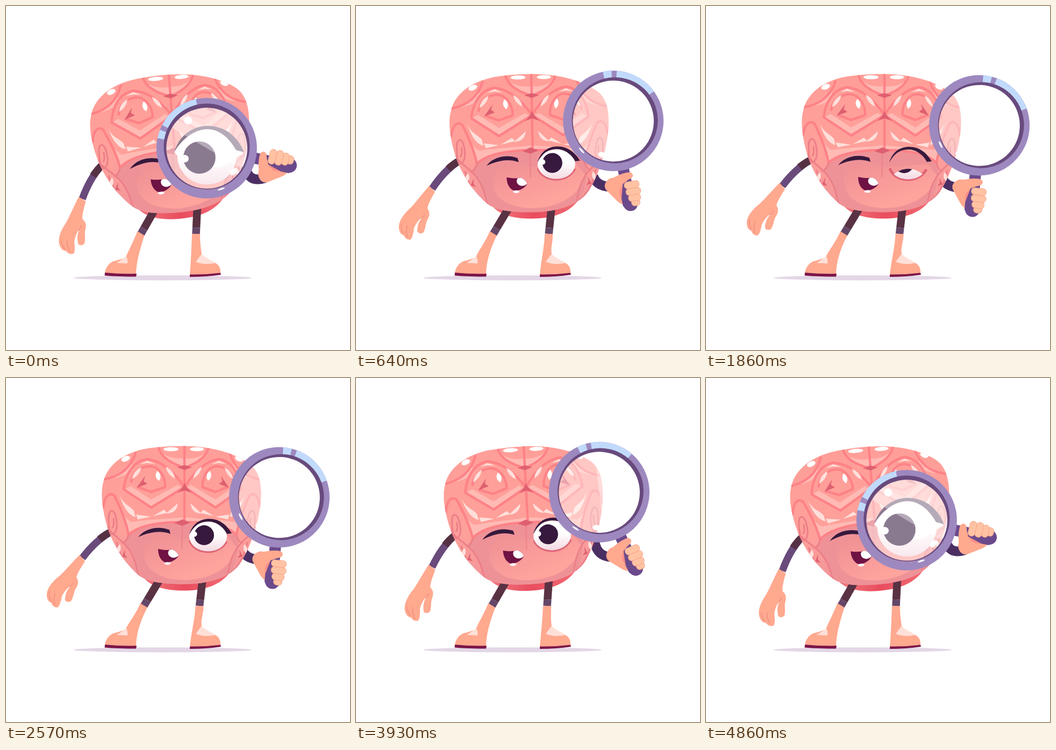
These frames come from a looping animation (640 px wide and 640 px high, 6.78 s). An HTML page:

```html
<!DOCTYPE html>
<html lang="en">
<head>
<meta charset="utf-8">
<title>Brain with magnifying glass</title>
<style>
html, body { margin: 0; width: 100%; height: 100%; overflow: hidden; background: #fff; }
svg { display: block; width: 100vw; height: 100vh; }
.groove { fill: none; stroke: #fd8287; stroke-width: 4.5; stroke-linejoin: round; stroke-linecap: round; }
.soft { stroke: #ec7f88; stroke-width: 3; }
.facet { fill: #ffbab4; }
.pit { fill: #de6070; }
.pale { fill: #ffdfda; }
.white { fill: #fff; }
.ink { fill: #36193d; }
.skin { fill: #ffa98f; }
.sole { fill: #7c1549; }
.tip { fill: #ffc3a3; stroke: #f59a84; stroke-width: .8; }
</style>
</head>
<body>
<svg viewBox="0 0 640 640">
<defs>
  <path id="outline" d="M330 126.500C385 126.500 432 142 456 162C473 177 476 200 474 230C470 270 456 312 437 343C425 362 395 383.500 330 383.500C290 383.500 262 379 247 367C220 344 198 310 187 272C178 240 176 212 181 194C188 161 222 136 270 130C290 127.500 310 126.500 330 126.500Z"/>
  <clipPath id="inBody"><use href="#outline"/></clipPath>
  <clipPath id="inEye"><path id="lid" d="M335 332V290Q376 242 418 290V332Z"/></clipPath>
  <clipPath id="inBigEye"><path id="bigLid"/></clipPath>
  <clipPath id="inGlass"><circle r="77"/></clipPath>
  <clipPath id="inMouth"><path id="mouth" d="M283 318C292 320 302 321 309 319C315 321 320 326 321 331C316 339 306 344 296 343C287 339 283 329 283 318Z"/></clipPath>
  <linearGradient id="bodyFill" x2="0" y2="1"><stop stop-color="#ff9e98"/><stop offset=".6" stop-color="#ffa09a"/><stop offset="1" stop-color="#f0939a"/></linearGradient>
  <linearGradient id="cheekFill" x2=".6" y2=".8"><stop stop-color="#ee8f94"/><stop offset="1" stop-color="#ffa39d"/></linearGradient>
  <linearGradient id="eyeFill" x2="0" y2="1"><stop offset=".45" stop-color="#fff"/><stop offset="1" stop-color="#f3d9e2"/></linearGradient>
  <linearGradient id="underFill"><stop stop-color="#f27a80"/><stop offset=".5" stop-color="#e94d5e"/><stop offset="1" stop-color="#f06a72"/></linearGradient>
  <path id="leaf" d="M0-10Q8 0 0 10Q-8 0 0-10Z"/>

  <g id="half">
    <path class="facet" d="M292 141C305 149 320 151 332 149V166C318 162 303 155 292 141ZM221 207L232 201L270 226L319 199L328 205L270 238ZM187 187C206 181 223 174 233 157L237 168C227 181 208 187 187 187ZM207 226C217 254 224 264 234 268C262 263 295 263 332 259V269C280 269 248 275 228 291Z"/>
    <path class="groove" d="M284 130C288 146 305 158 332 167M184 188C205 184 230 174 241 140M332 203L270 241L219 207C222 178 238 154 263 151C288 154 312 174 332 203M246 203L270 212L296 203C297 184 285 165 268 164C248 165 237 174 233 193M181 240C184 218 193 212 202 219C215 246 224 268 228 292C246 274 285 268 332 268"/>
    <path class="groove soft" d="M191 263C190 244 201 240 205 261C209 282 202 294 195 290C191 285 191 274 191 263M200 262C201 270 200 276 198 278M187 276C198 292 219 304 228 318C242 338 242 354 247 369M206 306C211 330 226 355 240 362M228 292C226 300 222 305 217 307"/>
    <path class="pit" d="M259 182L243 204L263 197L256 192ZM222 319L216 332L226 335L221 329Z"/>
    <path class="pale" d="M211 216C218 236 230 237 238 247L241 259C225 254 217 236 211 216ZM242 254L270 258L245 263ZM273 257L294 245L300 251ZM298 252L320 233C318 247 310 252 298 252ZM249 160L263 154L278 160L263 158Z"/>
    <use class="pale" href="#leaf" transform="translate(243 177) rotate(38) scale(.9 1.4)"/>
    <use class="pale" href="#leaf" transform="translate(306 176) rotate(-38) scale(.9 1.4)"/>
    <use class="pale" href="#leaf" transform="translate(210 318) rotate(12) scale(.9)"/>
    <use class="white" href="#leaf" transform="translate(283 182) rotate(-10) scale(1.1 .95)"/>
    <ellipse class="white" cx="222.500" cy="150.500" rx="8.500" ry="4.800" transform="rotate(-22 222 150)"/>
    <ellipse class="white" cx="307" cy="132.500" rx="14" ry="3.800"/>
  </g>
</defs>

<ellipse cx="291" cy="505.800" rx="166" ry="4.600" fill="#e3d6e6"/>

<g class="tilt"><path d="M252 366C266 389 298 395.500 330 395.500C364 395.500 394 388 413 366Z" fill="url(#underFill)"/></g>

<path id="sleeve" fill="none" stroke="#4b2f63" stroke-width="18"/>

<g class="tilt"><g id="arm">
  <path d="M194 287Q166 303 142 335" fill="none" stroke="#694a7b" stroke-width="13.500"/>
  <path d="M200 284Q186 290 174 300" fill="none" stroke="#563144" stroke-width="13.500"/>
  <path class="skin" d="M137 329L147 341C140 352 133 362 131 371C136 378 134 385 131 390C126 396 126 408 121 415C115 419 108 415 110 409C111 401 114 393 120 388C114 390 108 398 104 406C102 416 100 424 96 427C89 427 86 423 84 418C77 416 74 406 77 396C81 384 92 374 101 367C113 355 125 341 137 329Z"/>
  <path d="M81 397Q79 406 84 415M92 400Q87 411 91 422M118 388Q124 386 125 381" fill="none" stroke="#ef8880" stroke-width="1.200"/>
</g></g>

<g fill="none" stroke-width="14.500">
  <path id="thighL" stroke="#593243"/><path id="cuffL" stroke="#644768"/>
  <path id="thighR" stroke="#593243"/><path id="cuffR" stroke="#644768"/>
</g>
<path id="shinL" class="skin"/>
<path id="shinR" class="skin"/>
<path d="M206 478L224 466Q227 472 226 479ZM353 476L364 461C370 469 383 473 390 478Q370 483 353 476Z" fill="#ffe0d8"/>
<path class="sole" d="M184 496Q213 499 243 498L242 503.500Q210 503.500 183.500 501.500ZM342 499.500Q371 500 399 496.500L400 500Q372 504 342 504Z"/>

<g class="tilt">
  <use href="#outline" fill="url(#bodyFill)"/>
  <g clip-path="url(#inBody)">
    <path d="M228 292C246 274 285 268 328 270C380 266 415 272 428 292C440 310 424 345 412 390H247C244 345 240 325 217 307Z" fill="#ee9297"/>
    <path d="M308 291C275 288 257 300 257 326C257 356 285 376 335 376C385 375 420 350 430 316L412 294L327 300Z" fill="url(#cheekFill)"/>
    <use href="#half"/>
    <use href="#half" transform="translate(640.760) scale(-.93 1)"/>
    <path class="groove" d="M332 125V268"/>
    <path class="groove soft" d="M328 272L327 318" opacity=".6"/>
    <path class="pit" d="M318 214Q329 206 332 195Q336 206 347 214L332 209ZM318 166L332 162L346 166L332 171ZM313 270L328 263L343 269L328 275Z"/>
  </g>
  <path class="ink" d="M246 296C258 280 283 274 304 282.500L306 290C288 283 267 286 246 296Z"/>
  <use href="#mouth" fill="#6f1244"/>
  <g clip-path="url(#inMouth)"><ellipse class="white" cx="312" cy="325.500" rx="10.500" ry="9"/></g>
  <ellipse class="white" cx="300.500" cy="345" rx="6" ry="2.500"/>
  <path d="M342 302C350 327 394 332 410 304" fill="none" stroke="#de6474" stroke-width="5"/>
  <g clip-path="url(#inEye)">
    <ellipse cx="376" cy="295" rx="35" ry="27.500" fill="url(#eyeFill)"/>
    <circle class="ink" cx="368.500" cy="292.500" r="18.500"/>
    <circle class="white" cx="350.500" cy="290.500" r="5"/>
  </g>
  <path class="ink" d="M341 291C347 271 361 262 378 262C398 262 411 274 420 289L411 290C403 275 390 267 376 267C360 267 350 275 341 291Z"/>
</g>

<g id="lens">
  <g clip-path="url(#inGlass)">
    <g id="bigEye" transform="rotate(-10.500) translate(-373.500 -264.500)">
      <g clip-path="url(#inBigEye)">
        <ellipse cx="374" cy="279" rx="55" ry="53" fill="url(#eyeFill)"/>
        <path d="M313 272Q340 230 375 228Q420 235 442 274L400 300H340Z" fill="#fff"/>
        <circle class="ink" cx="360" cy="282" r="30"/>
      </g>
      <path id="bigLash" class="ink" d="M313 271C324 238 350 223 376 223C405 223 431 241 443 272L428 268C416 246 398 230 376 229C352 229 331 244 313 271Z"/>
    </g>
    <circle r="77" fill="#fff" opacity=".42"/>
    <path d="M-80 -29L80 29V-80H-80Z" fill="#fff" opacity=".36"/>
  </g>
  <path d="M89 -10.500H118L157 -13.500A13.500 13.500 0 0 1 158 13.500L118 13L110 10.500H89Z" fill="#6b4a8c" transform="rotate(1.200)"/>
  <circle r="85.300" fill="none" stroke="#9d89bf" stroke-width="16.400"/>
  <path id="shine" fill="none" stroke="#c1dafc" stroke-width="16.400"/>
  <path d="M-80.500 -3a80 80 0 1 1 160 0a80 80 0 1 1 -160 0ZM-75 0a75.300 75.300 0 1 0 150.600 0a75.300 75.300 0 1 0 -150.600 0Z" fill="#684a7d" fill-rule="evenodd"/>
  <circle class="white" cx="-43.300" cy="-44.300" r="7.500"/>
  <ellipse class="white" cx="57" cy="34" rx="8" ry="5" transform="rotate(-58 57 34)"/>
  <ellipse class="white" cx="40.400" cy="69.800" rx="7" ry="1.600" transform="rotate(-30 40.400 69.800)"/>
  <circle id="spark" class="white" cx="-36.200" cy="26.600" r="7"/>
  <g transform="rotate(-10.500) translate(-373.500 -264.500)">
    <path class="skin" d="M473 276C469 290 473 300 469 312C470 322 476 330 486 328L514 317C525 311 529 304 527 300L488 288Z"/>
    <path d="M488 295L518 308Q505 309 496 305Z" fill="#ff8f88"/>
    <path d="M486 284L528 291A11 11 0 0 1 526 311L512 308L488 295Z" fill="#6b4a8c"/>
    <path class="skin" d="M473 275C477 268 485 271 485 279C485 288 490 295 484 303L471 308C469 296 470 284 473 275Z"/>
    <g id="fingers"></g>
  </g>
</g>
</svg>
<script>
const $ = id => document.getElementById(id);
const set = (id, name, value) => $(id).setAttribute(name, value);
const LOOP = 6780, FRAME = 1000 / 14, RAD = Math.PI / 180;
const TILT = -4.5, PIVOT = [332, 497];

// cubic-bezier(.42, 0, .58, 1)
function ease(x) {
  if (x <= 0) return 0;
  if (x >= 1) return 1;
  let s = x;
  for (let i = 0; i < 5; i++)
    s -= (1.26 * s - .78 * s * s + .52 * s ** 3 - x) / (1.26 - 1.56 * s + 1.56 * s * s);
  return s * s * (3 - 2 * s);
}

function turn([x, y], deg, [cx, cy] = [0, 0]) {
  const c = Math.cos(deg * RAD), s = Math.sin(deg * RAD);
  return [cx + (x - cx) * c - (y - cy) * s, cy + (x - cx) * s + (y - cy) * c];
}

function arc(from, to, r) {
  return `M${turn([r, 0], from)}A${r} ${r} 0 0 1 ${turn([r, 0], to)}`;
}
set('shine', 'd', arc(-163, -113, 85.3) + arc(-179, -169, 85.3));

// x, y, half length of each finger
$('fingers').innerHTML = [[529, 286.5, 8], [520, 285, 11.5], [508.5, 282.5, 14], [496, 280.5, 14]]
  .map(([x, y, h]) => `<rect class="tip" x="${x - 6.5}" y="${y - h}" width="13" height="${2 * h}" rx="6" transform="rotate(14 ${x} ${y})"/>`)
  .join('');

function thigh(side, hip, knee) {
  const cuff = hip.map((v, i) => v + (knee[i] - v) * .78);
  set('thigh' + side, 'd', `M${hip}L${cuff}`);
  set('cuff' + side, 'd', `M${cuff}L${knee}`);
}

function draw(t) {
  const back = t > 2500;
  const p = back ? 1 - ease((t - 3360) / 930) : ease(t / 930);
  const q = back ? 1 - ease((t - 3340) / 1400) : p;
  const tilt = TILT * (1 - p);

  document.querySelectorAll('.tilt').forEach(g => g.setAttribute('transform', `rotate(${tilt} ${PIVOT})`));
  set('arm', 'transform', `rotate(${-13 * (1 - p)} 190 290)`);

  const kneeL = [251 + 5.5 * p, 424], kneeR = [353.5 + 6.5 * p, 424];
  thigh('L', turn([286, 375], tilt, PIVOT), kneeL);
  thigh('R', turn([366, 372], tilt, PIVOT), kneeR);
  const [a] = kneeL, [b] = kneeR;
  set('shinL', 'd', `M${a - 6.5} 419C${a - 14} 438 228 455 223 467C212 474 200 472 192 480C186 487 184 492 184 498L242 500C242 478 249 453 ${a + 6.5} 427Z`);
  set('shinR', 'd', `M${b - 7.5} 424C${b - 8.5} 450 344 475 342 501L399 498C400 488 396 481 389 478C378 474 366 466 364 461C362 448 ${b + 7.5} 440 ${b + 7.5} 424Z`);

  // The glass swings with the hand.
  const deg = 10.5 + 83 * q, bow = q * (1 - q);
  const grip = [511 - 11 * q + 50 * bow, 290 + 71.7 * (q - .8 * bow * (.5 - q))];
  const reach = turn([140, 0], deg);
  const hub = [grip[0] - reach[0], grip[1] - reach[1]];
  set('lens', 'transform', `translate(${hub}) rotate(${deg})`);
  const w = turn([118, 34], deg);
  set('sleeve', 'd', `M${446 - 6 * p} ${298 + 22 * p}Q${450 - 5 * p} ${331 + 4 * p} ${hub[0] + w[0]} ${hub[1] + w[1]}`);

  const seen = Math.max(0, Math.min(1, (.37 - q) / .12));
  set('bigEye', 'opacity', seen);
  set('spark', 'opacity', seen);
  set('bigLash', 'opacity', Math.max(0, 1 - q / .2));
  set('bigLid', 'd', `M305 278Q375 ${182 + 260 * q} 443 276V345H305Z`);

  const u = (t - 22 * FRAME) / (14 * FRAME);
  const shut = u > 0 && u < 1 ? Math.sin(Math.PI * u) ** 2 : 0;
  set('lid', 'transform', `translate(0 ${60 * shut})`);
}

const start = performance.now();
function tick() {
  const t = (performance.now() - start) % LOOP;
  draw(Math.floor((t + 3) / FRAME) * FRAME);
  requestAnimationFrame(tick);
}
tick();
</script>
</body>
</html>
```
